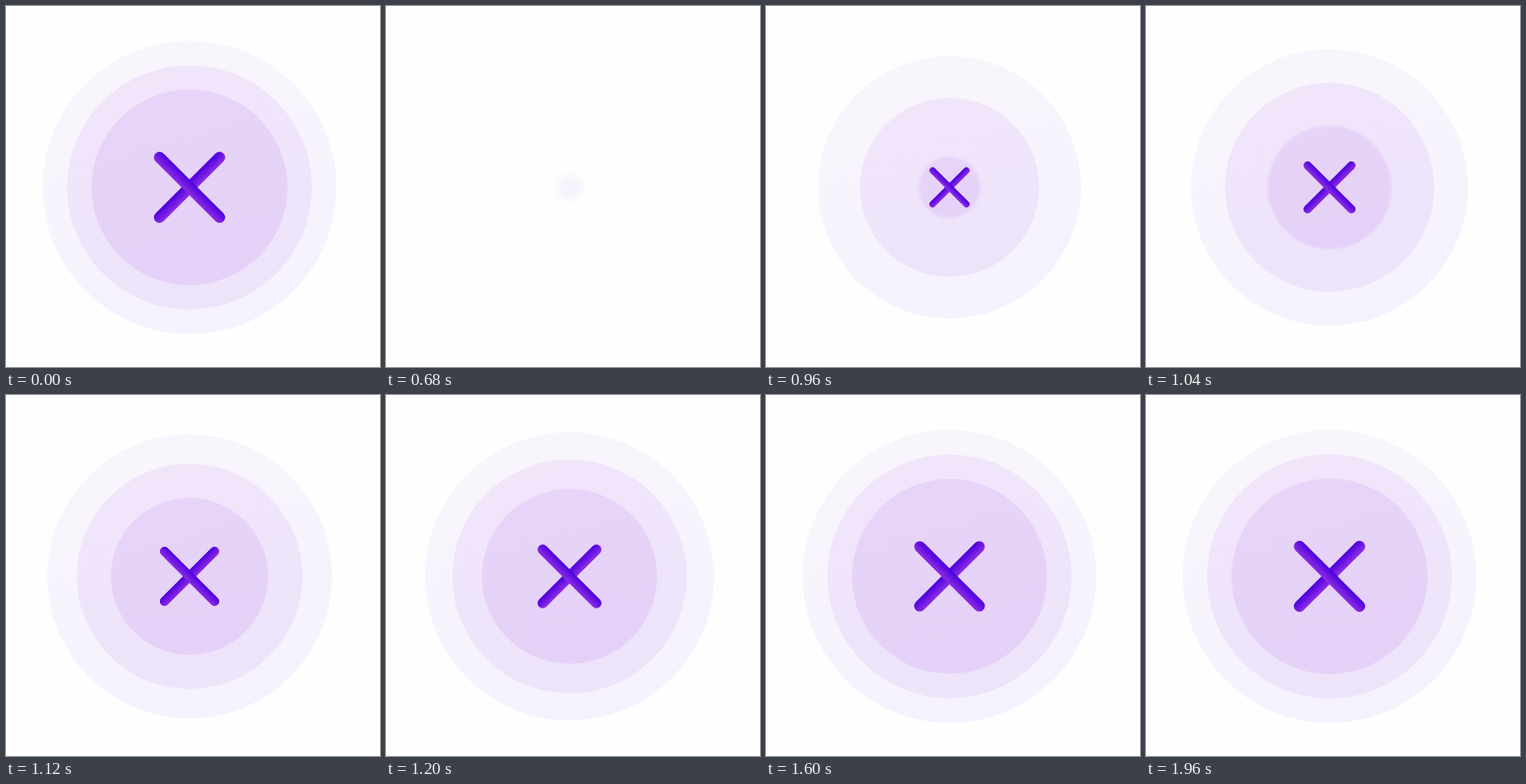
Recreate the animation shown at these times as an HTML page with a canvas. Size 430x416 px, loop 2000 ms.

```html
<!DOCTYPE html>
<html lang="en">
<head>
<meta charset="utf-8">
<title>Close pulse</title>
<style>
  html, body { margin: 0; width: 100%; height: 100%; overflow: hidden; background: #fefefe; }
  canvas { display: block; }
</style>
</head>
<body>
<canvas id="stage" width="430" height="416"></canvas>
<script>
const ctx = document.getElementById('stage').getContext('2d');
const LOOP = 2000, CUT = 680;

const discs = [
  { radius: 169, start: 669, rate: 0.0077, from: '#f9f5fc', to: '#f5f2fe' },
  { radius: 140.8, start: 790, rate: 0.0077, from: '#f1e5fa', to: '#ede4fa' },
  { radius: 112.7, start: 913, rate: 0.0078, from: '#e7d4f8', to: '#e5d1f7' }
];
const cross = { start: 823, rate: 0.006 };

// Exponential ease-out from 0 to 1; everything rests at full size before the cut.
function grow(t, { start, rate }) {
  if (t < CUT) return 1;
  return t < start ? 0 : 1 - Math.exp(-rate * (t - start));
}

function gradient(x, y, from, to) {
  const g = ctx.createLinearGradient(-x, -y, x, y);
  g.addColorStop(0, from);
  g.addColorStop(1, to);
  return g;
}

function drawDisc(t, disc) {
  const k = grow(t, disc), r = disc.radius * k;
  if (!r) return;
  // Soften the edge in proportion to its speed.
  const blur = disc.radius * (1 - k) * disc.rate * 2.5;
  ctx.filter = blur > 0.2 ? `blur(${blur}px)` : 'none';
  ctx.fillStyle = gradient(r * 0.3, r, disc.from, disc.to);
  ctx.beginPath();
  ctx.arc(0, 0, r, 0, 2 * Math.PI);
  ctx.fill();
  ctx.filter = 'none';
}

function drawBar(dir) {
  ctx.strokeStyle = gradient(-4.6 * dir, 4.6, '#4a00e0', '#8e2de2');
  ctx.beginPath();
  ctx.moveTo(-34.5 * dir, -34.5);
  ctx.lineTo(34.5 * dir, 34.5);
  ctx.stroke();
}

function draw(t) {
  ctx.setTransform(1, 0, 0, 1, 0, 0);
  ctx.fillStyle = '#fefefe';
  ctx.fillRect(0, 0, 430, 416);
  ctx.translate(211, 209);
  discs.forEach(disc => drawDisc(t, disc));

  const k = grow(t, cross);
  if (!k) return;
  ctx.scale(k, k);
  ctx.lineWidth = 13;
  ctx.lineCap = 'round';
  drawBar(-1);
  drawBar(1);
}

const begin = performance.now();
function tick() {
  draw((performance.now() - begin) % LOOP);
  requestAnimationFrame(tick);
}
tick();
</script>
</body>
</html>
```
